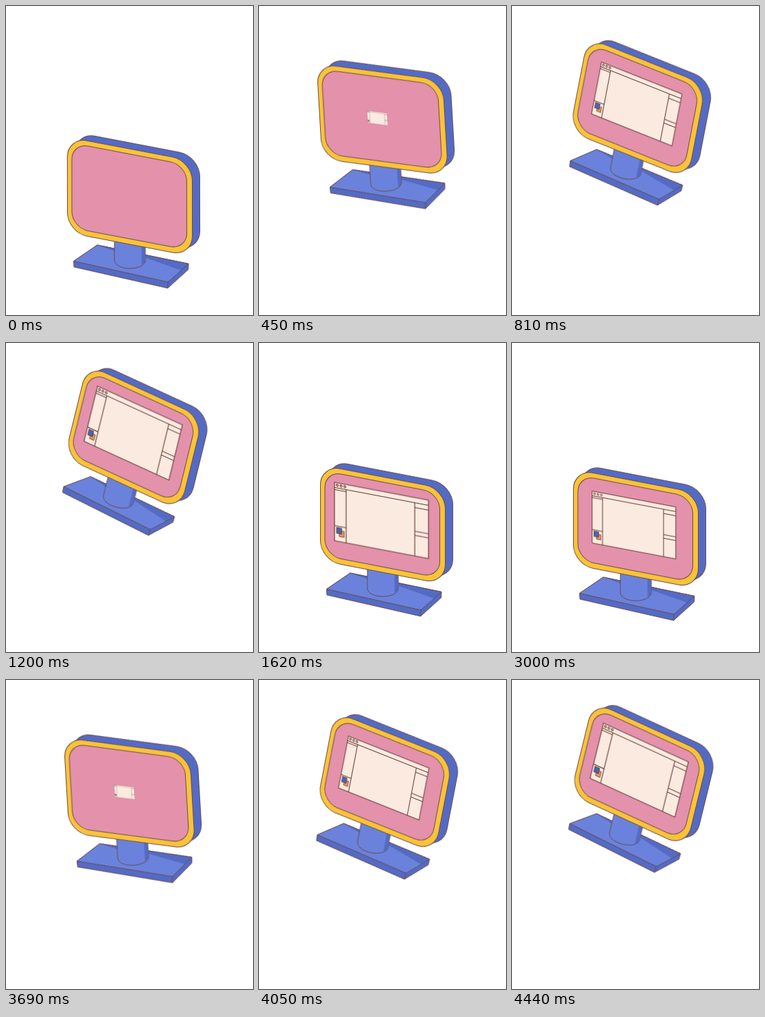
These frames come from a looping animation (360 by 450 pixels, 4500 ms). An HTML page without scripts:

```html
<!DOCTYPE html>
<html lang="en">
<head>
<meta charset="utf-8">
<title>Hopping monitor</title>
<style>
  html, body { margin: 0; width: 100%; height: 100%; overflow: hidden; background: #fff; }
  svg { display: block; width: 100%; height: 100%; }

  .line { stroke: #664a50; stroke-width: 1; stroke-linejoin: round; }
  .side { fill: #546bc4; }
  .top { fill: #6b82dc; }
  .frame { fill: #f9c338; }
  .glass { fill: #e491ac; }
  .paper { fill: #fbeadf; }
  .rule { fill: none; stroke: #5e352e; stroke-width: 1.1; }

  .monitor { transform-origin: 178px 272px; animation: hop 4.5s linear infinite; }
  .window { transform-origin: 172px 276px; animation: zoom 4.5s linear infinite; }

  @keyframes hop {
    0%      { transform: translate(0, 0) rotate(0deg); }
    2%      { transform: translate(-4px, -1px) rotate(-8deg); }
    3.333%, 75.333% { transform: translate(-8px, -3px) rotate(-14deg); }
    4.667%, 76.667% { transform: translate(-9px, -10px) rotate(-18deg); }
    7.333%, 79.333% { transform: translate(-5px, -66px) rotate(-13deg); animation-timing-function: ease-out; }
    10%, 82%        { transform: translate(-1px, -112px) rotate(-3.5deg); animation-timing-function: ease-out; }
    12.667%, 84.667% { transform: translate(2px, -122px) rotate(7deg); }
    15.333%, 87.333% { transform: translate(3px, -126px) rotate(10deg); }
    25.333%, 97.333% { transform: translate(6.5px, -138px) rotate(13.4deg); }
    26.667% { transform: translate(7px, -140.5px) rotate(13.8deg); animation-timing-function: ease-in; }
    33%     { transform: translate(0, -5px) rotate(0deg); animation-timing-function: ease-in; }
    36%     { transform: translate(0, -13px) rotate(0deg); animation-timing-function: ease-out; }
    40%     { transform: translate(0, -26px) rotate(0deg); animation-timing-function: ease-in-out; }
    48%     { transform: translate(0, -6.5px) rotate(0deg); animation-timing-function: ease-in-out; }
    57%     { transform: translate(0, -7.5px) rotate(0deg); }
    66.667% { transform: translate(0, -7px) rotate(0deg); }
    71.333% { transform: translate(0, -4.5px) rotate(0deg); }
    72%     { transform: translate(0, -1px) rotate(0deg); }
    74%     { transform: translate(-4px, -1px) rotate(-8deg); }
    98.667%, 100% { transform: translate(7px, -140.5px) rotate(13.8deg); }
  }

  @keyframes zoom {
    0%, 8.667%, 71%, 80.667% { transform: scale(0); }
    10%, 82%     { transform: scale(.21); }
    12.667%, 84.667% { transform: scale(.58); }
    15.333%, 87.333% { transform: scale(.82); animation-timing-function: ease-out; }
    21%, 93%     { transform: scale(.95); }
    26.667%, 98.667%, 100% { transform: scale(.975); }
    33%, 62%     { transform: scale(1); animation-timing-function: ease-in; }
    66.667%      { transform: scale(.89); animation-timing-function: ease-in; }
  }
</style>
</head>
<body>
<svg viewBox="0 0 360 450" aria-label="A monitor hopping up and down">
  <g class="monitor">
    <!-- foot -->
    <path class="side line" d="M98.500 371.500L133 348 266 375.500 265.500 384 235.500 411 99 380Z"/>
    <path class="top" d="M98.500 371.500L133 348 266 375.500 236 402Z"/>
    <path class="side" d="M133 348L266 375.500 255 385 204 367 158 357Z"/>
    <path class="line" fill="none" d="M98.500 371.500L133 348 266 375.500 236 402ZM236 402L235.500 411"/>

    <!-- neck -->
    <path class="top line" d="M158 335V371C160 386 201 386 203 371V335Z"/>
    <path class="side" d="M197.500 335V377Q202 375 202.500 371V335Z"/>

    <!-- body -->
    <g transform="matrix(1 .192 0 1 89.500 190.600)">
      <rect class="side line" x="11" y="-9" width="182" height="139" rx="30"/>
      <rect class="side line" x="5.500" y="-4.500" width="182" height="139" rx="30" stroke-opacity="0"/>
      <rect class="frame line" width="182" height="139" rx="29"/>
      <rect class="glass line" x="6.500" y="7.500" width="167.500" height="123.500" rx="24"/>
    </g>

    <!-- app window -->
    <g class="window">
      <g transform="matrix(1 .19 0 1 110 216)">
        <rect class="paper" width="137" height="85"/>
        <rect x="7" y="69" width="7" height="8.500" fill="#e89a55" stroke="#5e352e" stroke-width=".8"/>
        <rect x="3" y="65" width="7.500" height="8.500" fill="#4a63b8" stroke="#5e352e" stroke-width=".8"/>
        <path class="rule" d="M0 0H137V85H0ZM0 7.500H137M0 10.500H17M17 7.500V85M0 63H17M117 7.500V85M117 14.500H137M117 49H137M117 55H137"/>
        <g class="rule">
          <circle cx="4" cy="3.600" r="1.500"/>
          <circle cx="9.500" cy="3.600" r="1.500"/>
          <circle cx="15" cy="3.600" r="1.500"/>
        </g>
      </g>
    </g>
  </g>
</svg>
</body>
</html>
```
